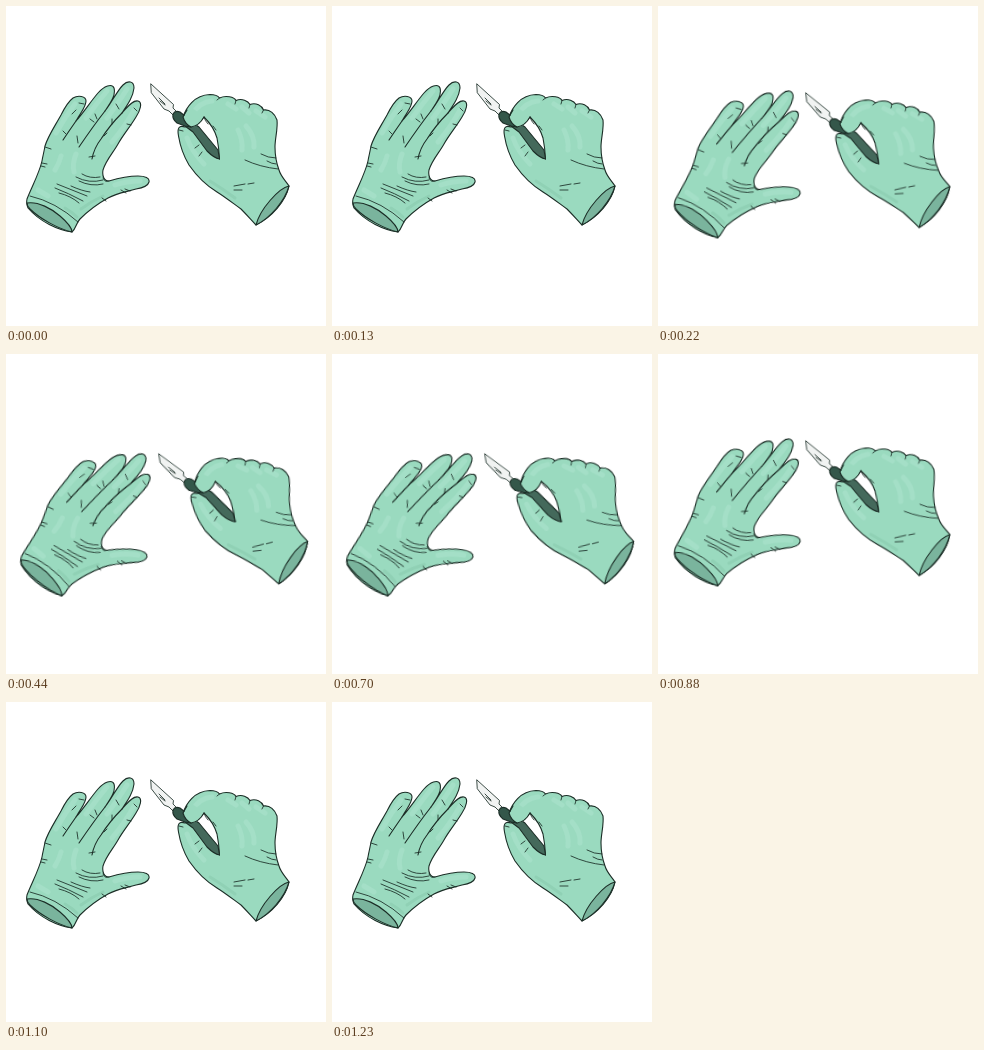
Animation of 320x320 px, one loop 1320 ms. Source, as an HTML page:

```html
<!DOCTYPE html>
<html lang="en">
<head>
<meta charset="utf-8">
<title>Gloved hands with scalpel</title>
<style>
  html, body { margin: 0; width: 100%; height: 100%; overflow: hidden; background: #fff; }
  svg { display: block; width: 100vw; height: 100vh; }
  .ink { fill: none; stroke: #1b2d26; stroke-width: 1.1; stroke-linecap: round; stroke-linejoin: round; }
  .thin { stroke-width: .85; }
  .glove { fill: #9adabf; }
  .inside { fill: #7ab49d; }
  .shine { fill: none; stroke: #a4dfc7; stroke-linecap: round; stroke-width: 5; }
  .shade { fill: none; stroke: #90d1b5; stroke-linecap: round; stroke-width: 3; }
  .steel { fill: #f1f3f2; }
  .handle { fill: #44695b; }
  .collar { fill: #34574a; }
  .hole { fill: #fff; }
  .hand { animation: 1320ms step-end infinite; }
  #open { transform-origin: 21px 194px; animation-name: open; }
  #grip { transform-origin: 145px 78px; animation-name: grip; }
  @keyframes open {
    0%, 83.3333% { transform: none; }
    16.6667%, 66.6667% { transform: translate(-4px, 1.5px) rotate(5deg) scale(1.015); }
    33.3333% { transform: translate(-5.5px, 9px) rotate(8.6deg) scale(1.015); }
  }
  @keyframes grip {
    0%, 83.3333% { transform: none; }
    16.6667%, 66.6667% { transform: translate(3px, 9px) rotate(-3.4deg); }
    33.3333% { transform: translate(8px, 22px) rotate(-6deg) scale(1.005); }
  }
</style>
</head>
<body>
<svg viewBox="0 0 320 320">
  <g id="open" class="hand">
    <path class="ink glove" d="M21 193C26 180 33 168 36 155C37 149 38 146 39 140C42 130 49 120 55 109C59 101 63 95 67 92
      C72 89 80 90 80 95C80 101 75 106 70 115C78 106 85 95 92 87C98 80 106 77 108 82C110 89 105 96 99 105
      C106 96 111 85 117 79C122 74 128 75 128 82C127 91 122 98 116 107C121 102 126 94 132 95
      C137 96 134 105 130 111C124 121 117 129 112 138C107 147 100 154 97 164C96 170 98 175 103 175
      C113 172 122 170 132 170C139 170 144 172 143 176C142 180 136 182 130 183C120 186 111 187 102 192
      C93 197 81 206 74 213C70 217 70 223 66 226C52 224 34 216 22 202Q20 198 21 193Z"/>
    <path class="shine" d="M50 127Q59 111 69 98M80 112Q91 97 101 85M101 112Q113 96 121 83M106 136Q119 121 128 104M55 150Q53 158 49 164M70 148Q66 158 68 166M109 179Q121 175 134 175M32 184L42 190"/>
    <path class="shade" d="M75 203Q86 195 97 190M59 202Q66 206 71 211"/>
    <path class="ink inside" d="M21 197C32 195 46 203 54 210C61 216 66 221 66 226C53 223 34 213 24 203Q21 200 21 197Z"/>
    <path class="ink" d="M70 115Q63 125 57 134M99 105Q88 119 73 141M116 107Q104 119 95 133Q88 142 86 153"/>
    <path class="ink thin" d="M24 190Q50 196 72 216M36 157L41 158M35 160L39 161M39 141L45 143
      M66 108L70 104M73 97L78 98M60 128L57 125M84 113L88 116M89 108L91 113M71 130L72 137
      M110 98L113 103M106 113L106 118M98 130L101 127M83 151L89 150
      M70 171Q83 178 97 174M73 175Q85 181 97 178M76 168Q84 173 94 171M97 172Q99 177 103 175
      M51 178Q66 184 81 190M49 182Q62 187 77 195M53 187Q65 190 73 197M65 180Q76 185 84 186
      M115 184L120 187M119 183L124 185M96 192L100 195M128 102L131 105M121 118L125 119"/>
  </g>

  <g id="grip" class="hand">
    <path class="ink thin steel" d="M145 78L167.5 98.5L167 102L172 107L168 110L163 105L158 103L145.5 87Z"/>
    <path class="ink thin" d="M153 92L159 98M154 95L159 99"/>
    <path class="ink glove" d="M177 111C180 102 188 89 204 88.5C209 88.5 212 90 213.5 92C220 89 228 91 230 94.5
      C236 92 242 95 244 98.5C250 96 256 100 257.5 104C264 103 269 108 271 114C272 123 269 132 269 141
      C269 149 270 156 273 164C275 171 280 175 283 180C280 195 266 211 250 219C246 215 242 210 235 203
      C228 198 219 191 211 186C201 180 190 169 183 159C177 149 174 139 172.5 130C171 122 173 119 179 121
      L190 118Z"/>
    <path class="shine" d="M186 108Q194 96 206 95M222 98L230 103M236 101L243 107M250 105L259 111M240 120Q249 130 248 141M232 124Q237 134 236 144M181 132Q186 146 198 158"/>
    <path class="shade" d="M204 175Q217 183 229 192"/>
    <path class="ink hole" d="M190 119L198 111C204 117 209 125 211 132Q213 142 213.5 153Z"/>
    <path class="ink handle" d="M181 113L193 121L212 144L213.5 153Q208 152 201 145L187 126L179 120Z"/>
    <path class="ink collar" d="M167 108Q169 104 174 106L184 114L185 121L179 120L171 117Q166 113 167 108Z"/>
    <path class="glove" d="M177 111L186 102L198 110Q194 120 186 121Q179 119 177 111Z"/>
    <path class="ink" d="M181 104L177 111Q179 118 185 121Q193 120 198 111"/>
    <path class="ink inside" d="M283 180C273 182 254 203 250 219C264 212 279 195 283 180Z"/>
    <path class="ink thin" d="M213.5 92L211 94M230 94.5L229 98M244 98.5L243 102M257.5 104L256 107
      M198 111Q199 115 202 118M207 120L210 124M173 124L177 125M189 142L193 139M193 150L196 146
      M255 148Q262 152 270 152M239 154Q254 161 272 163M261 155Q266 158 270 158
      M228 180L239 178M242 178L248 177M228 184L236 184"/>
  </g>
</svg>
</body>
</html>
```
